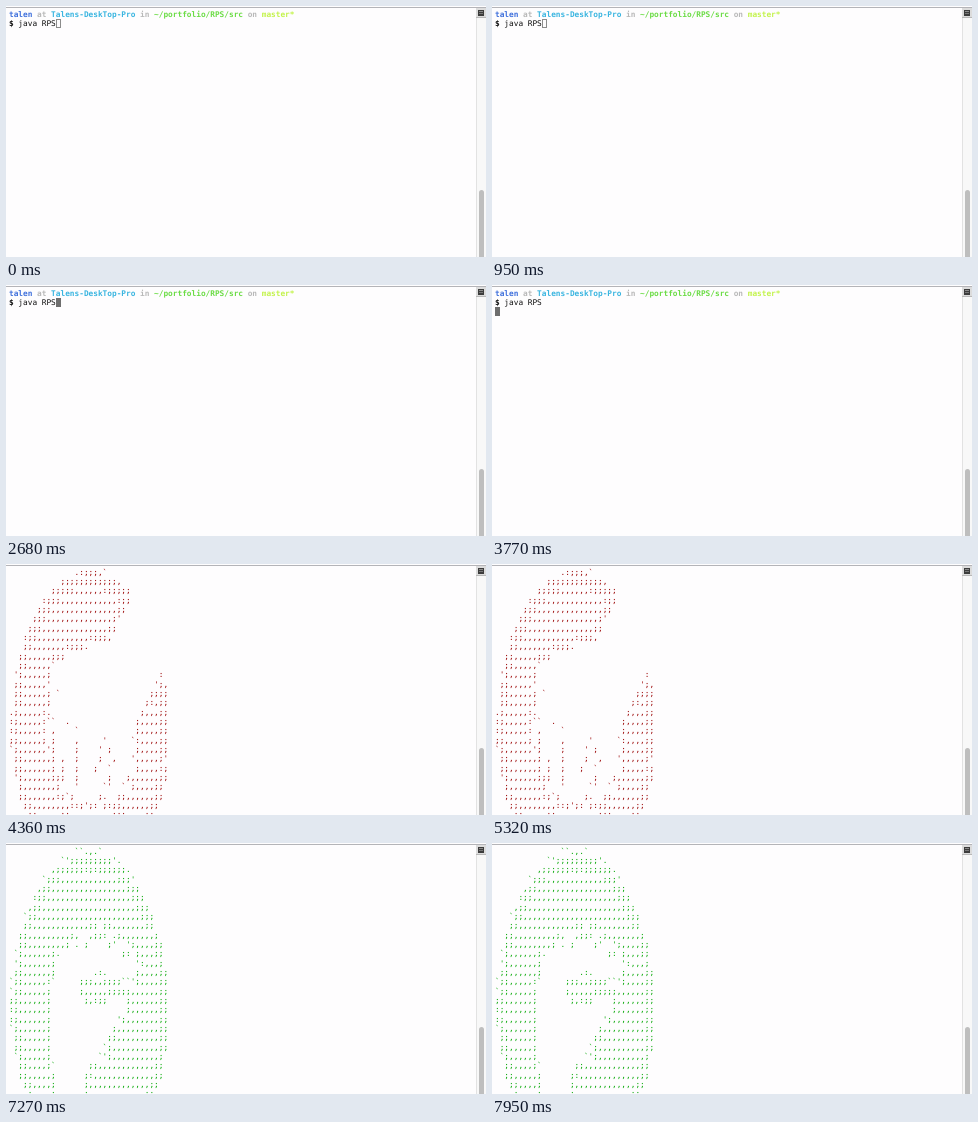
An HTML page with a canvas for the animation above (8000 ms loop, 480 by 251 pixels).

```html
<!DOCTYPE html>
<html lang="en">
<head>
<meta charset="utf-8">
<title>Terminal game</title>
<style>
html, body { margin: 0; width: 100%; height: 100%; overflow: hidden; background: #fefdfe; }
canvas { display: block; width: 480px; height: 251px; }
</style>
</head>
<body>
<canvas id="stage" width="480" height="251"></canvas>

<script type="text/plain" id="red">
              .:;;;,`
           ;;;;;;;;;;;;,
         ;;;;;,,,,,,:;;;;;
       :;;;,,,,,,,,,,,,:;;
      ;;;,,,,,,,,,,,,,,;;
     ;;;,,,,,,,,,,,,,,;'
    ;;;,,,,,,,,,,,,,,;;
   :;;,,,,,,,,,,,:;;;,
   ;;,,,,,,,:;;;.
  ;;,,,,,;;;
  ;;,,,,,`
 ';,,,,,;                       :
 ;;,,,,,'                      ';,
 ;;,,,,,; `                   ;;;;
 ;;,,,,,;                    ;:,;;
.;,,,,,:.                   ;,,,;;
:;,,,,,:``  .              ;,,,,;;
:;,,,,,: ,    `            ;,,,,;;
;;,,,,,; ;    ,     '     `:,,,,;;
`;,,,,,,';    ;    ' ;     ;,,,,;;
 ;;,,,,,,; ,  ;    ;  ,   ',,,,,;'
 ;;,,,,,,; ;  ;   ;  `     ;,,,,:;
 ';,,,,,,;;;  ;      ;   ;,,,,,,;;
  ;,,,,,,,;   '     `'  ` ;,,,,;;
  ;;,,,,,,:;`;     ;.  ;;,,,,,,;;
   ;;,,,,,,,,::;';: ;:;;,,,,,,;;
    ;;,,,,,;;         ;;;,,,,;;
</script>

<script type="text/plain" id="blue">
              .:;;;,
           ';;;;;;;;;;;.
         ;;;;;:,,,,:;;;;;,
       ;;;;,,,,,,,,,,,,;;;;
      ;;;,,,,,,,,,,,,,,,,;;;
     ;;;,,,,,,,,,,,,,,,,,,:;;
    ;;;,,,,,,,,,,,,,,,,,,,,;;;
   ;;;,,,,,,,,,,,,,,,,,,,,,,:;;
   ;;,,,,,,,,,,,,,,,:,,,,,,,,;;;
  ;;,:;;,,,,,,,,,,,:; ,;,,,,,,;;
  ;;,;   ,;;,,,,,,;;.   :;,,,,,;;
 ';,;       `';,,;        ;;,,,;;
 ;;,,,;'         :           `.,,
 ;;,,,,,;;      .   ;:
.;:,,,,,,,;;        ,:
;;,,,,,,,,,,;,.  ;  .;
;;,,,,,,,,,,,,;. ' , .
;;,,,:;;;;;,`    .;   ;
;;,;                   ;;
.;,;
 ;;;;;:,,,:;;;;;.   ``
 ;;,,,,,,,,,;       ;,      :';;'`
 ';,,,,,,,,;     .'   ,    '.,,;;
  ;;,,,,,,,;;;'`     ,    ',,,,;;
  ;;,,,,,,,,,:'     ;'   ;,,,,,;;
   ;;,,,,,,,,,'    ;,:;;,,,,,:;;
    ;;;,,,,,;;      ;;;,,,,,;;
</script>

<script type="text/plain" id="green">
              ``.,.`
           `';;;;;;;;;'.
         ,;;;;;;:;:;;;;;;.
       `;;;,,,,,,,,,,,,;;;'
      ,;;,,,,,,,,,,,,,,,,;;;
     :;;,,,,,,,,,,,,,,,,,,;;;
    ,;;,,,,,,,,,,,,,,,,,,,,;;;
   `;;,,,,,,,,,,,,,,,,,,,,,,;;;
   ;;,,,,,,,,,,,,;; ;;,,,,,,,;;
  ;;,,,,,,,,,;,  ,;;: .;,,,,,,,;
  ;;,,,,,,,,; . ;    ;'  ';,,,,;;
 `;,,,,,,;.             ;: ;,,,;;
 ';,,,,,,;                 ':,,,;
 ;;,,,,,,;        .:.      ;,,,,;;
`;;,,,,,:`     ;;;,,;;;;``';,,,,;;
`;;,,,,,;      ;,,,,,;;;;;,,,,,,;;
;;,,,,,,;       ;,:;;    ;,,,,,,;;
:;,,,,,,;                ;,,,,,,;;
:;,,,,,,;              ';,,,,,,,;;
`;,,,,,,;             ;,,,,,,,,,;;
 ;;,,,,,;            ;;,,,,,,,,,;;
 ;;,,,,,;           `;,,,,,,,,,,;;
 `;,,,,,;          `';,,,,,,,,,,;
  ;;,,,,;`       ;;,,,,,,,,,,,,;;
  ;;,,,,,;      ;:,,,,,,,,,,,,,;;
   ;;,,,,;      ;,,,,,,,,,,,,,;;
    ;,,,,;      ;,,,,,,,,,,,,;;
</script>

<script>
const LOOP = 8000, CELL = 4.68, ROW = 9.33, LEFT = 3, BASE = 10.8;
const FONT = '7.8px "DejaVu Sans Mono", monospace';
const ctx = document.getElementById('stage').getContext('2d');

const prompt = [
  ['talen', '#3f70dc'], [' at ', '#b9b9b9'], ['Talens-DeskTop-Pro', '#3ab5e0'],
  [' in ', '#b9b9b9'], ['~/portfolio/RPS/src', '#6bdc45'], [' on ', '#b9b9b9'],
  ['master*', '#c3f34c']
];

const art = id => document.getElementById(id).textContent.replace(/^\n/, '').split('\n');
const hands = [
  { start: 4200, color: '#990000', rows: art('red') },
  { start: 5550, color: '#0000b2', rows: art('blue') },
  { start: 6900, color: '#00a600', rows: art('green') }
];

function rect(x, y, w, h, color) {
  ctx.fillStyle = color;
  ctx.fillRect(x, y, w, h);
}

// Writes on the character grid and returns the next column.
function write(text, col, row, color, bold) {
  ctx.font = (bold ? 'bold ' : '') + FONT;
  ctx.fillStyle = color;
  for (const ch of text) {
    if (ch !== ' ') ctx.fillText(ch, LEFT + col * CELL, BASE + row * ROW);
    col++;
  }
  return col;
}

function drawWindow() {
  rect(0, 0, 480, 251, '#fefdfe');
  rect(0, 1, 480, 1, '#b4b4b8');
  rect(470, 2, 10, 249, '#f8f8f8');
  rect(470, 2, 1, 249, '#e2e2e2');
  rect(470, 2, 10, 10, '#dcdcdc');
  rect(470, 11, 10, 1, '#b8b8b8');
  rect(472, 4, 6, 6, '#3c3c3c');
  rect(473, 5, 4, 1, '#8a8a8a');
  rect(473, 7, 4, 1, '#777');
  ctx.fillStyle = '#bebebe';
  ctx.beginPath();
  ctx.roundRect(473, 184, 5, 72, 2.5);
  ctx.fill();
}

function drawCursor(col, row, filled) {
  const x = Math.round(LEFT + col * CELL), y = 13 + Math.round((row - 1) * ROW);
  if (filled) {
    rect(x, y, 5, 9, '#6e6e6e');
  } else {
    ctx.strokeStyle = '#8c8c8c';
    ctx.lineWidth = 1;
    ctx.strokeRect(x + 0.5, y + 0.5, 4, 8);
  }
}

function drawShell(t) {
  let col = 0;
  for (const [text, color] of prompt) col = write(text, col, 0, color, true);
  write('$', 0, 1, '#111', true);
  write('java RPS', 2, 1, '#111');
  if (t < 3700) drawCursor(10, 1, t >= 2550);
  else drawCursor(0, 2, true);
}

function draw(t) {
  drawWindow();
  const hand = hands.filter(h => t >= h.start).pop();
  if (hand) hand.rows.forEach((line, row) => write(line, 0, row, hand.color));
  else drawShell(t);
}

const begin = performance.now();
function tick() {
  draw((performance.now() - begin) % LOOP);
  requestAnimationFrame(tick);
}
tick();
</script>
</body>
</html>
```
